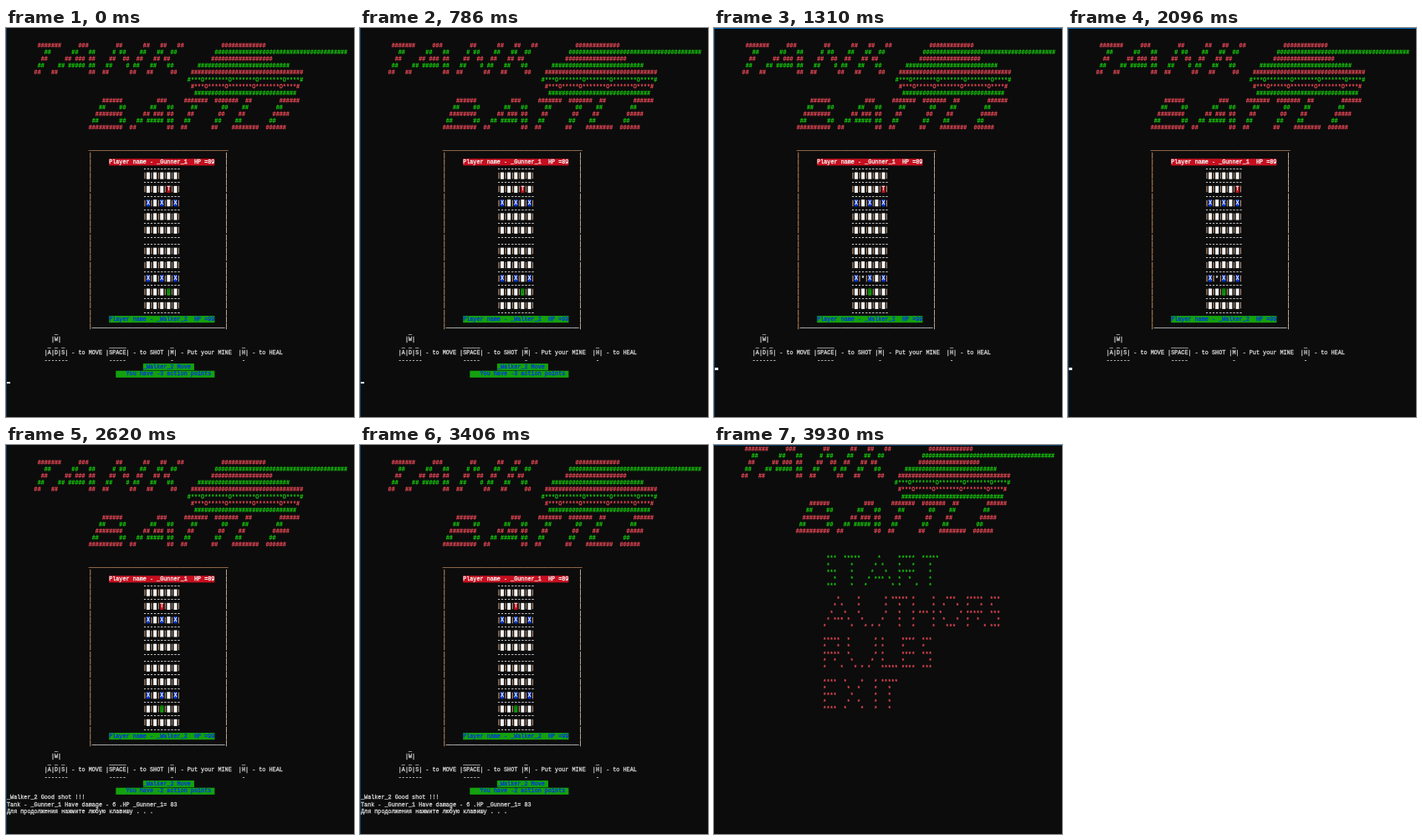
An HTML page that plays this animation: 416 px wide and 465 px high, repeating every 5240 ms.

```html
<!DOCTYPE html>
<html lang="en">
<head>
<meta charset="utf-8">
<title>Console tank game</title>
<style>
html, body { margin: 0; width: 100%; height: 100%; overflow: hidden; background: #0c0c0c; }
#edge { position: absolute; left: 0; top: 0; width: 1px; height: 100%; background: #0b3c68; }
#top { position: absolute; left: 0; top: 0; width: 100%; height: 1px; }
#screen {
  position: absolute; left: .5px; top: .7px; width: 820px; height: 915px;
  transform: scale(.509); transform-origin: 0 0;
  font: 13.333px/16.05px "Liberation Mono", "Courier New", monospace;
  -webkit-text-stroke: .6px;
}
#screen span { position: absolute; white-space: pre; height: 16.05px; }
</style>
</head>
<body>
<div id="screen"></div>
<div id="edge"></div>
<div id="top"></div>
<script>
const CELL = 8, LINE = 16.05, HOLD = 1310;
const RED = '#e74856', GREEN = '#16c60c', GREY = '#d4d4d4', WHITE = '#f2f2f2',
      BLUE = '#0037da', DARK_RED = '#c50f1f', DARK_GREEN = '#13a10e', TAN = '#c98f63';
const P1 = '_Gunner_1', P2 = '_Walker_2';
const screenEl = document.getElementById('screen');
const edgeEl = document.getElementById('edge');
const topEl = document.getElementById('top');
let page;

function put(row, col, text, color = GREY, bg = '') {
  const s = document.createElement('span');
  s.textContent = text;
  s.style.cssText = `left:${col * CELL}px;top:${row * LINE}px;color:${color};background:${bg}`;
  page.append(s);
}

function art(row, col, lines, color) {
  lines.forEach((t, i) => put(row + i, col, t, color || (i % 2 ? GREEN : RED)));
}

function cursor(row) {
  put(row, 0, ' ', WHITE, `linear-gradient(transparent 60%, ${WHITE} 60% 92%, transparent 92%)`);
}

const tankWord = [
  ' #######     ###        ##      ##   ##   ##',
  '   ##      ##   ##     # ##    ##   ##  ##',
  '  ##     ## ### ##    ##  ##  ##   ## ##',
  ' ##    ## ##### ##   ##    # ##   ##   ##',
  '##   ##         ##  ##      ##   ##     ##'
];
const starWord = [
  '    ######          ###     #######  #######  ##        ######',
  '   ##    ##       ##   ##     ##       ##    ##        ##',
  '  ########      ## ### ##    ##       ##    ##        #####',
  ' ##      ##   ## ##### ##   ##       ##    ##        ##',
  '##########  ##         ##  ##       ##    ########  ######'
];
const menu = [
  [
    ' ***  *****     *     *****  *****',
    ' *      *      * *    *   *    *',
    ' ***    *     *   *   *****    *',
    '   *    *    * *** *  *  *     *',
    ' ***    *   *       * *    *   *'
  ], [
    '    *     *       * ***** *     *   ***   *****  ***',
    '   * *    *       *   *   *     *  *   *  *   *  *',
    '  *   *   *       *   *   * *** * *     * *****  ***',
    ' * *** *   *     *    *   *     *  *   *  *  *     *',
    '*       *   * * *     *   *     *   ***   *    * ***'
  ], [
    '*****  *       * *     ****  ***',
    '*   *  *       * *     *     *',
    '*****  *       * *     ****  ***',
    '*  *    *     *  *     *       *',
    '*    *   * * *   ***** ****  ***'
  ], [
    '****  *    *   * *****',
    '*      *  *    *   *',
    '****    *      *   *',
    '*      *  *    *   *',
    '****  *    *   *   *'
  ]
];

function title(row) {
  const tank = [[63, 13], [61, 39], [60, 18], [56, 27], [54, 33],
    [53, '#***O*******O*******O*******O****#'],
    [54, '#***O*****O*******O*******O****#'], [55, 30]];
  art(row, 8, tankWord);
  tank.forEach(([col, t], i) =>
    put(row + i, col, t.big ? t : '#'.repeat(t), i % 2 ? GREEN : RED));
  art(row + 8, 24, starWord);
}

function board({ red, green, mine }) {
  put(17, 24, '_'.repeat(41), TAN);
  for (let r = 18; r <= 43; r++) {
    put(r, 24, '|', TAN);
    put(r, 64, '|', '#dcc4b2');
  }
  put(43, 25, '_'.repeat(39), WHITE);
  put(19, 30, `Player name - ${P1}  HP =89`, WHITE, DARK_RED);
  put(42, 30, `Player name - ${P2}  HP =99`, BLUE, DARK_GREEN);

  for (let i = 0; i < 12; i++) put(20 + 2 * i - (i > 5), 40, '-'.repeat(11), WHITE);
  for (let i = 0; i < 10; i++) {
    const row = 21 + 2 * i + (i > 4);
    put(row, 40, '| | | | | |', '#e0b48f');
    for (let k = 0; k < 5; k++) {
      const at = (r, c) => i === r && k === c;
      let cell = [' ', WHITE, WHITE];
      if ((i === 2 || i === 7) && k % 2 === 0) cell = ['X', WHITE, BLUE];
      if (at(1, red)) cell = ['T', WHITE, DARK_RED];
      if (at(8, green)) cell = ['T', '#0b6a0a', DARK_GREEN];
      if (at(7, mine)) cell = ['*', WHITE, '#0c0c0c'];
      put(row, 41 + 2 * k, ...cell);
    }
  }
}

function help() {
  put(44, 14, '_');
  put(45, 13, '|W|');
  put(47, 11, '|A|D|S| - to MOVE |SPACE| - to SHOT |M| - Put your MINE  |H| - to HEAL');
  put(46, 12, '_ _ _');
  put(48, 11, '-------');
  for (const [col, n] of [[30, 5], [48, 1], [69, 1]]) {
    put(46, col, '_'.repeat(n));
    put(48, col, '-'.repeat(n));
  }
}

function turn(points) {
  put(49, 40, `${P2} Move `, BLUE, DARK_GREEN);
  put(50, 32, `   You have -${points} action points `, BLUE, DARK_GREEN);
}

function game(state) {
  title(2);
  board(state);
  help();
}

const scenes = [
  () => { game({ red: 3, green: 3 }); turn(3); cursor(51); },
  () => { game({ red: 4, green: 2, mine: 1 }); cursor(49); },
  () => {
    game({ red: 2, green: 2 });
    turn(2);
    put(51, 0, `${P2} Good shot !!!`);
    put(52, 0, `Tank - ${P1} Have damage - 6 .HP ${P1}= 83`);
    put(53, 0, 'Для продолжения нажмите любую клавишу . . .');
  },
  () => {
    title(0);
    menu.forEach((word, i) => art(16 + 6 * i, 32, word, i ? RED : GREEN));
  }
];
const topColors = ['transparent', '#0067b8', 'transparent', '#0b3c68'];

const pages = scenes.map(draw => {
  page = document.createElement('div');
  draw();
  screenEl.append(page);
  return page;
});

function tick() {
  const now = Math.floor(performance.now() / HOLD) % pages.length;
  const inMenu = now === 3;
  pages.forEach((p, i) => p.hidden = i !== now);
  topEl.style.background = topColors[now];
  edgeEl.hidden = inMenu;
  screenEl.style.left = inMenu ? '-.4px' : '.5px';
  requestAnimationFrame(tick);
}
tick();
</script>
</body>
</html>
```
